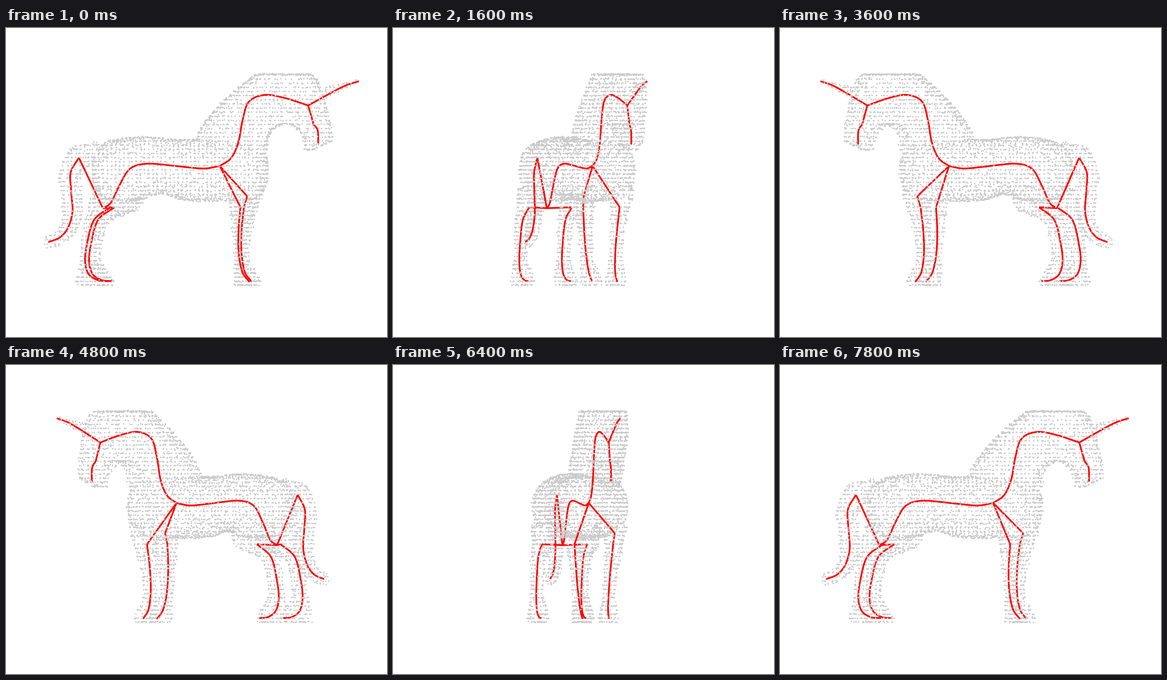
These frames come from a looping animation (831 by 674 pixels, 8 s). A matplotlib script:

```python
import numpy as np
import matplotlib.pyplot as plt
from matplotlib.animation import FuncAnimation

W, H, DPI = 831, 674, 100
FRAMES, INTERVAL = 40, 200
CX = 415.5                    # axis of rotation on the stage
START = np.radians(-5)        # model heading at the first frame
CELL = 9.0                    # sampling grid of the point cloud
GRID_TURN = np.radians(9)     # grid heading against the model
KEEP, JITTER = 0.7, (1.2, 0.6, 1.2)
GRAY, RED = "#cbcbcb", "#ff0000"


def fore_gap(y):
    """Distance of a front leg from the middle plane."""
    return 45 - 0.085 * (y - 370)


def hind_gap(y):
    return 50.5 + 0 * y


def smooth(*pts, n=12):
    """Catmull-Rom curve through key points of the side view."""
    p = np.array(pts, float)
    p = np.vstack([2 * p[0] - p[1], p, 2 * p[-1] - p[-2]])
    t = np.linspace(0, 1, n, endpoint=False)[:, None]
    out = [b + t / 2 * (c - a + t * (2 * a - 5 * b + 4 * c - d + t * (3 * (b - c) + d - a)))
           for a, b, c, d in zip(p, p[1:], p[2:], p[3:])]
    return np.vstack(out + [p[-2:-1]])


# Key joints and curves, seen from the side
HEAD, CHEST, HIP, DOCK, JAW = (660, 169), (466.5, 301), (210.5, 393), (158, 283), (672, 210)
TAIL = smooth(DOCK, (140, 315), (141, 355), (144, 400), (134, 436), (116, 457), (91, 467))
NECK = smooth(HEAD, (610, 153), (565, 146), (530, 161), (516, 203), (507, 250),
              (491, 284), CHEST)
SPINE = smooth(CHEST, (430, 306.5), (370, 301), (307, 296), (270, 307), (248, 341),
               (228, 381), HIP)
HORN = smooth((771, 116), (734, 129), HEAD)
MUZZLE = smooth(JAW, (681, 224), (682, 254))
HIND = smooth((231.5, 391), (195.5, 419), (180, 472), (176, 510), (184, 537),
              (204, 550), (226.5, 552))
FORE = smooth((515.5, 391), (511, 440), (511, 490), (518.5, 532), (534, 554))


def slab(x, z, left, right, wide, power):
    """Rounded horizontal slice between two side edges."""
    return (np.abs(2 * x - left - right) / (right - left)) ** power + (np.abs(z) / wide) ** power < 1


def tube(x, y, z, path, r0, r1, depth):
    """Tapering tube along a path; depth scales its half width."""
    hit = np.zeros(x.shape, bool)
    for (px, py), r in zip(path, np.linspace(r0, r1, len(path))):
        hit |= (x - px) ** 2 + (y - py) ** 2 + (z / depth) ** 2 < r * r
    return hit


def torso(x, y, z):
    top = 240 + 3 * np.cos(np.pi * (x - 385) / 85)
    low = 377 - 16 * np.exp(-((x - 338) / 35) ** 2)
    rise = np.abs(2 * y - top - low) / (low - top)
    return np.abs((x - 379) / 191) ** 10 + rise ** 2.4 + np.abs(z / 74) ** 2.4 < 1


def neck_and_head(x, y, z):
    down = np.clip((y - 100) / 136, 0, 1)
    left = 418 + 127 * (1 - down) ** 1.4
    right = 655 + 56 * down ** 0.4
    taper = np.clip((x - 560) / 80, 0, 1) * np.clip((y - 150) / 110, 0, 1)
    throat = ((x - 610) / 44) ** 2 + ((y - 262) / 54) ** 2 < 1
    return (slab(x, z, left, right, 45 - 22 * taper, 4) & ~throat
            & (y > 100.5) & (y < 265) & (x + 2 * y < 1200))


def legs(x, y, z):
    z = np.abs(z)
    up = np.clip((500 - y) / 140, 0, 1)
    hoof = np.clip((y - 500) / 60, 0, 1)
    wide = 12 + 10 * up ** 2 + 10 * hoof
    thigh = 35 * (1 + np.tanh((408 - y) / 12))
    hind = slab(x, z - hind_gap(y), 167 + 24 * up ** 1.8 - 12 * hoof,
                197 + 28 * up + thigh + 37 * hoof, wide, 2.4)
    fore = slab(x, z - fore_gap(y), 501 - 10 * up,
                525 + 30 * up ** 1.5 + 31 * hoof, wide, 2.4)
    return (hind | fore) & (y > 350) & (y < 560)


def inside(p):
    """Whether points, given as grid coordinates, lie in the body."""
    x, y, z = to_model(p)
    x = x + CX
    horn = np.linspace((690, 143), (774, 113), 14)
    root = np.linspace((190, 272), DOCK, 5)
    return (torso(x, y, z) | neck_and_head(x, y, z) | legs(x, y, z)
            | tube(x, y, z, horn, 11, 4, 1)
            | tube(x, y, z, root, 24, 25, 0.7)
            | tube(x, y, z, TAIL[::3], 28, 13, 0.7))


def to_model(p):
    c, s = np.cos(GRID_TURN), np.sin(GRID_TURN)
    return np.array([p[0] * c + p[2] * s, p[1], p[2] * c - p[0] * s])


def surface():
    """Points where the grid's edges cross the body's surface, thinned a little."""
    axes = (CELL * np.arange(-43, 44), 165 + CELL * np.arange(-8, 46),
            CELL * np.arange(-16, 17))
    grid = np.array(np.meshgrid(*axes, indexing="ij"))
    full = inside(grid)
    found = []
    for k in range(3):
        n = full.shape[k]
        lo, hi = np.arange(n - 1), np.arange(1, n)
        cross = full.take(lo, k) != full.take(hi, k)
        a = grid.take(lo, k + 1)[:, cross]
        b = grid.take(hi, k + 1)[:, cross]
        at_a = full.take(lo, k)[cross]
        for _ in range(8):
            m = (a + b) / 2
            same = inside(m) == at_a
            a, b = np.where(same, m, a), np.where(same, b, m)
        found.append((a + b) / 2)
    pts = to_model(np.hstack(found))
    rng = np.random.default_rng(4)
    pts = pts[:, rng.random(pts.shape[1]) < KEEP]
    return pts + rng.normal(size=pts.shape) * np.array(JITTER)[:, None]


def skeleton():
    """All bones as one line, with gaps between the parts."""
    def bone(path, z=0.0):
        path = np.asarray(path, float)
        return np.column_stack([path, np.broadcast_to(z, len(path))])

    def straight(a, b, za=0.0, zb=0.0, n=30):
        return np.linspace((*a, za), (*b, zb), n)

    lines = [bone(p) for p in (NECK, SPINE, TAIL, HORN, MUZZLE)]
    lines += [straight(HIP, DOCK), straight(HEAD, JAW)]
    far_fore = np.vstack([(522.5, 367), FORE])
    for side, root, path, gap in ((1, HIP, HIND, hind_gap), (-1, HIP, HIND, hind_gap),
                                  (1, CHEST, FORE, fore_gap), (-1, CHEST, far_fore, fore_gap)):
        z = side * gap(path[:, 1])
        lines += [straight(root, path[0], 0, z[0]), bone(path, z)]
    gap = np.full((1, 3), np.nan)
    bones = np.vstack([part for line in lines for part in (line, gap)]).T
    bones[0] -= CX
    return bones


def view(p, angle):
    """Screen x, screen y and nearness after a turn about the upright axis."""
    x, y, z = p
    c, s = np.cos(angle), np.sin(angle)
    return CX + x * c + z * s, y, z * c - x * s


cloud, bones = surface(), skeleton()

fig = plt.figure(figsize=(W / DPI, H / DPI), dpi=DPI, facecolor="white")
ax = fig.add_axes([0, 0, 1, 1])
ax.set(xlim=(0, W), ylim=(H, 0))
ax.axis("off")

dot = dict(ls="", marker="s", ms=3 * 72 / DPI, mew=0, color=GRAY)
back, = ax.plot([], [], zorder=1, **dot)
line, = ax.plot([], [], color=RED, lw=3.7 * 72 / DPI, zorder=2,
                solid_joinstyle="round", solid_capstyle="butt")
front, = ax.plot([], [], zorder=3, **dot)


def update(i):
    angle = START + 2 * np.pi * i / FRAMES
    x, y, near = view(cloud, angle)
    bx, by, bnear = view(bones, angle)
    close = (np.abs(x[:, None] - bx) < 4.5) & (np.abs(y[:, None] - by) < 4.5)
    behind = (close & (near[:, None] < bnear)).any(axis=1)
    back.set_data(x[behind], y[behind])
    front.set_data(x[~behind], y[~behind])
    line.set_data(bx, by)
    return back, line, front


anim = FuncAnimation(fig, update, frames=FRAMES, interval=INTERVAL,
                     repeat=True, repeat_delay=0, blit=False)
plt.show()
```
